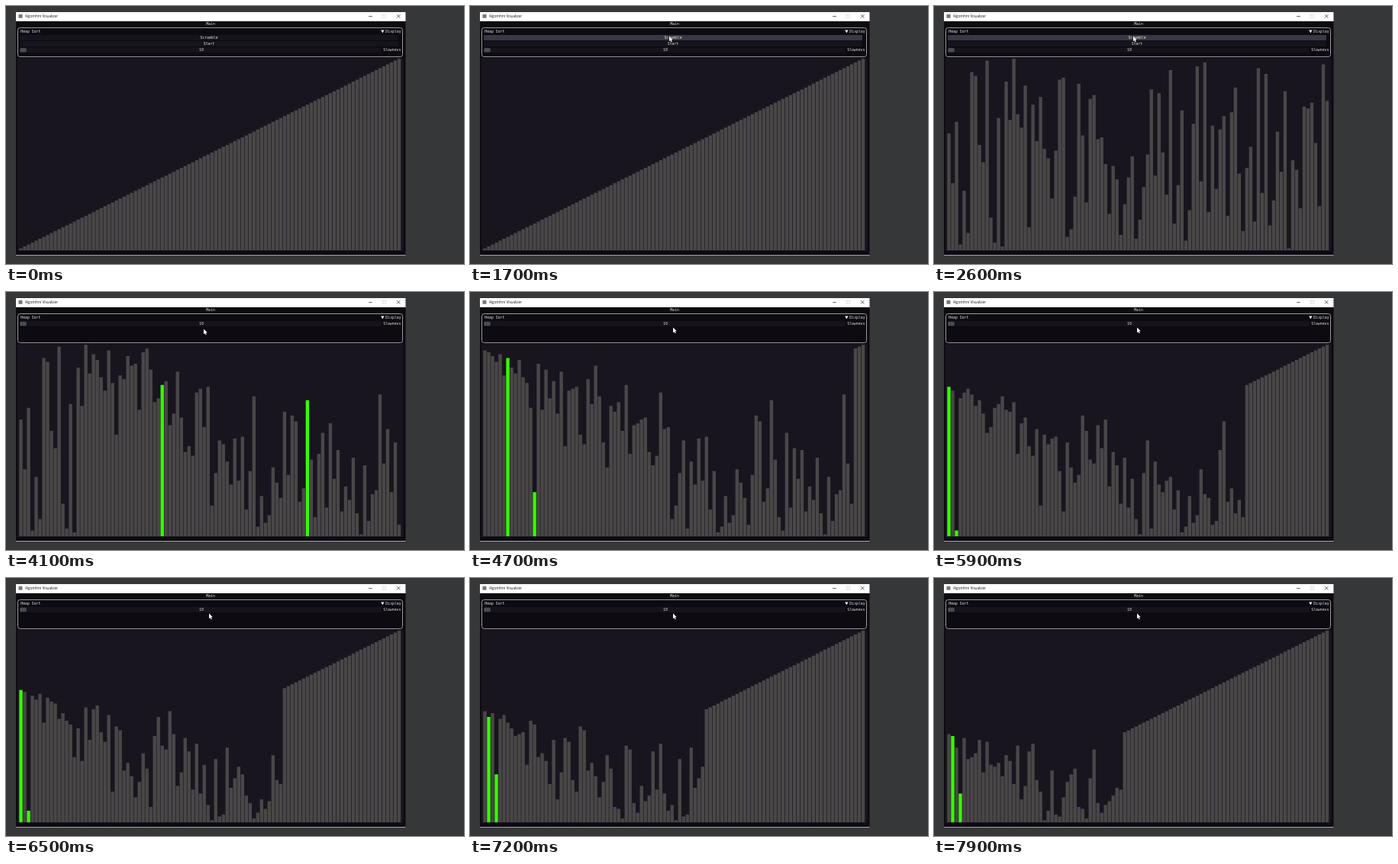
Recreate the animation shown at these times as an HTML page with a canvas. Size 600 px wide and 338 px high, loop 8 s.

```html
<!DOCTYPE html>
<html lang="en">
<head>
<meta charset="utf-8">
<title>Algorithm Visualizer</title>
<style>
html, body { margin: 0; width: 100%; height: 100%; overflow: hidden; background: #363739; }
canvas { display: block; width: 600px; height: 338px; }
</style>
</head>
<body>
<canvas id="stage"></canvas>
<script>
const LOOP = 8000, TICK = 100, COUNT = 100;
const SCRAMBLE_AT = 2600, START_AT = 3800;
const MONO = '"DejaVu Sans Mono", monospace';
const SANS = '"Open Sans", sans-serif';

const canvas = document.getElementById('stage');
const dpr = window.devicePixelRatio || 1;
canvas.width = 600 * dpr;
canvas.height = 338 * dpr;
const ctx = canvas.getContext('2d');
ctx.scale(dpr, dpr);

const sorted = Array.from({ length: COUNT }, (_, i) => i + 1);
const shuffled = [
  61, 35, 67, 3, 31, 9, 93, 91, 55, 46, 99, 17, 4, 69, 2, 88, 68, 100, 71, 64,
  86, 12, 76, 57, 80, 53, 48, 27, 52, 89, 90, 7, 11, 28, 87, 60, 25, 79, 81, 58,
  59, 45, 19, 44, 37, 8, 24, 38, 49, 6, 16, 33, 50, 84, 39, 82, 51, 29, 94, 14,
  34, 73, 5, 21, 66, 96, 36, 98, 20, 65, 32, 63, 70, 18, 72, 85, 40, 10, 43, 54,
  15, 95, 30, 92, 13, 26, 62, 41, 83, 1, 47, 42, 22, 75, 74, 77, 56, 23, 97, 78
];

// Every swap of the heap sort, with a snapshot of the values after it.
function heapSort(input) {
  const v = input.slice();
  const steps = [{ v: input, pair: [], size: COUNT }];
  const swap = (a, b, size) => {
    [v[a], v[b]] = [v[b], v[a]];
    steps.push({ v: v.slice(), pair: [a, b], size });
  };
  const sift = (root, size) => {
    for (;;) {
      let top = root;
      for (const child of [2 * root + 1, 2 * root + 2]) {
        if (child < size && v[child] > v[top]) top = child;
      }
      if (top === root) return;
      swap(root, top, size);
      root = top;
    }
  };
  for (let i = COUNT / 2 - 1; i >= 0; i--) sift(i, COUNT);
  for (let size = COUNT - 1; size > 0; size--) {
    swap(0, size, size);
    sift(0, size);
  }
  return steps;
}

const steps = heapSort(shuffled);
const stepOf = (size, offset) => steps.findIndex(s => s.size === size) + offset;

// [time, swaps done]
const pace = [
  [3830, 0], [4100, 26], [5300, stepOf(88, 3)], [6500, stepOf(69, 1)], [7900, stepOf(46, 2)]
];
// [time, x, y] of the pointer tip
const pointer = [
  [200, 597, 66], [300, 545, 30], [400, 505, 40], [500, 505, 40], [700, 570, 34],
  [800, 596, 58], [1000, 440, 52], [1400, 275, 44], [1700, 261, 39.5], [3000, 261, 39.5],
  [3500, 259, 48.5], [4200, 259, 48.5], [4700, 266, 46.5]
];

// Linear interpolation of column k through timed keys.
function along(keys, t, k) {
  if (t <= keys[0][0]) return keys[0][k];
  for (let i = 1; i < keys.length; i++) {
    const a = keys[i - 1], b = keys[i];
    if (t <= b[0]) return a[k] + (b[k] - a[k]) * (t - a[0]) / (b[0] - a[0]);
  }
  return keys[keys.length - 1][k];
}

function box(x, y, w, h, fill, r = 0) {
  ctx.fillStyle = fill;
  ctx.beginPath();
  ctx.roundRect(x, y, w, h, r);
  ctx.fill();
}

function line(points, color, width) {
  ctx.strokeStyle = color;
  ctx.lineWidth = width;
  ctx.beginPath();
  for (const [x1, y1, x2, y2] of points) {
    ctx.moveTo(x1, y1);
    ctx.lineTo(x2, y2);
  }
  ctx.stroke();
}

// Small type is set ten times larger and scaled down to keep its spacing exact.
function text(str, x, y, align = 'left', size = 4.8, font = MONO, color = '#e4e4e6') {
  ctx.save();
  ctx.translate(x, y);
  ctx.scale(0.1, 0.1);
  ctx.font = `${size * 10}px ${font}`;
  ctx.textAlign = align;
  ctx.textBaseline = 'alphabetic';
  ctx.fillStyle = color;
  ctx.fillText(str, 0, 0);
  ctx.restore();
}

function drawWindow() {
  box(0, 0, 600, 338, '#363739');
  box(13, 8, 510.5, 319, '#0d0b11');
  box(13, 8, 510.5, 12, '#ffffff');
  box(13, 326, 510.5, 0.9, '#a4a4a8');
  box(16.5, 10.8, 5, 5, '#77797c');
  text('Algorithm Visualizer', 25, 15.2, 'left', 4.63, SANS, '#111');
  line([[475.2, 13.5, 479.8, 13.5]], '#222', 0.7);
  ctx.strokeStyle = '#cfcfcf';
  ctx.lineWidth = 0.6;
  ctx.strokeRect(493.3, 11.3, 4.2, 4.2);
  line([[512, 11.2, 516.4, 15.6], [516.4, 11.2, 512, 15.6]], '#222', 0.7);
  text('Main', 268, 25, 'center');
  box(15, 68, 505.5, 253, '#18151f');
}

function drawButton(label, y, state) {
  box(18, y, 496, 7, { idle: '#15131b', hover: '#3a3845', down: '#55535f' }[state], 1);
  text(label, 266, y + 5.3, 'center');
}

function drawSlider(y) {
  box(18, y, 473.5, 7, '#15131b', 1);
  box(18.2, y + 0.7, 8.6, 5.6, '#4b4a50', 1.6);
  text('10', 256, y + 5.2, 'center');
  text('Slowness', 517.3, y + 5.2, 'right');
}

function drawPanel(t, x, y) {
  box(15.5, 28.5, 504, 38, '#0d0b11', 3);
  ctx.strokeStyle = '#bcbcc0';
  ctx.lineWidth = 0.8;
  ctx.stroke();
  text('Heap Sort', 19.3, 35.2);
  text('Display', 517.6, 35.2, 'right');
  ctx.fillStyle = '#f0f0f0';
  ctx.beginPath();
  ctx.moveTo(491.2, 31.4);
  ctx.lineTo(495.4, 31.4);
  ctx.lineTo(493.3, 35.4);
  ctx.fill();

  if (t >= START_AT) {
    drawSlider(38);
    return;
  }
  const pressed = t >= 2400 && t < SCRAMBLE_AT;
  const inside = top => t >= 200 && x >= 18 && x <= 514 && y >= top && y < top + 7.6;
  const state = top => !inside(top) ? 'idle' : pressed ? 'down' : 'hover';
  drawButton('Scramble', 38, state(38));
  drawButton('Start', 46.1, state(46.1));
  drawSlider(54.2);
}

function drawBars(values, pair) {
  values.forEach((v, i) => {
    const h = v * 2.51;
    box(17.3 + i * 5.005, 320 - h, 4.4, h, pair.includes(i) ? '#36fb02' : '#494747');
  });
}

function drawPointer(x, y) {
  const shape = [[0, 0], [0, 6.8], [1.6, 5.4], [2.7, 7.8], [3.8, 7.3], [2.7, 5], [4.8, 4.8]];
  ctx.beginPath();
  for (const [dx, dy] of shape) ctx.lineTo(x + dx, y + dy);
  ctx.closePath();
  ctx.strokeStyle = '#111';
  ctx.lineWidth = 0.8;
  ctx.stroke();
  ctx.fillStyle = '#fff';
  ctx.fill();
}

function draw(time) {
  const t = Math.floor((time % LOOP + 0.01) / TICK) * TICK;
  const x = along(pointer, t, 1), y = along(pointer, t, 2);
  const step = steps[Math.round(along(pace, t, 1))];
  drawWindow();
  drawPanel(t, x, y);
  if (t < SCRAMBLE_AT) drawBars(sorted, []);
  else drawBars(step.v, step.pair);
  if (t >= 200) drawPointer(x, y);
}

let start;
function tick(now) {
  start ??= now;
  draw(now - start);
  requestAnimationFrame(tick);
}
draw(0);
requestAnimationFrame(tick);
</script>
</body>
</html>
```
